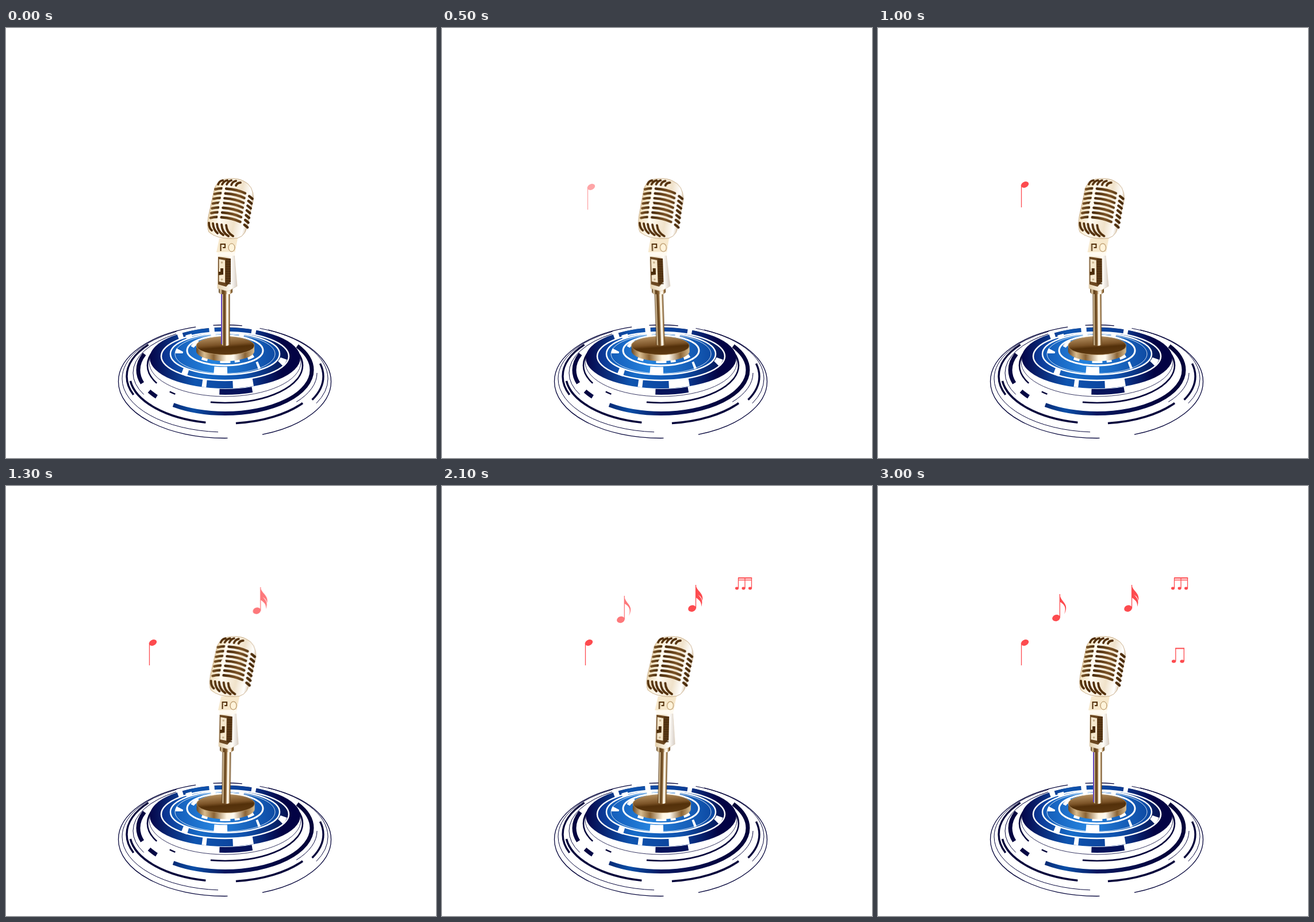
Recreate the animation shown at these times as an HTML page without scripts. Size 748 by 748 pixels, loop 3300 ms.

```html
<!DOCTYPE html>
<html lang="en">
<head>
<meta charset="utf-8">
<title>Microphone</title>
<style>
html, body { margin: 0; width: 100%; height: 100%; overflow: hidden; background: #fff; }
svg { display: block; width: 100vw; height: 100vh; fill: none; overflow: hidden; }

.mic, .note, .glint { animation: 3300ms infinite; }
.mic { transform-origin: 380px 600px; animation-name: sway; animation-timing-function: steps(6); }
.glint { animation-name: glint; animation-timing-function: step-end; }
.note { fill: #fd4b4f; stroke: #fd4b4f; stroke-width: 0; animation-timing-function: steps(4); }
.stem { fill: none; stroke-width: 1.3; }
.beam { fill: none; stroke-width: 2; }
.quarter { animation-name: quarter; }
.sixteenth { animation-name: sixteenth; }
.triplet { animation-name: triplet; }
.eighth { animation-name: eighth; }
.pair { animation-name: pair; }

@keyframes sway {
  0%, 90.9%, to { transform: skewX(0deg); }
  18.18% { transform: skewX(2.4deg); }
  36.36% { transform: skewX(-.6deg); }
  54.54% { transform: skewX(-1.8deg); }
  72.72% { transform: skewX(-.6deg); }
}
@keyframes glint {
  0%, 90.9%, to { opacity: 1; }
  3.03% { opacity: 0; }
}
@keyframes quarter {
  0%, 9.09% { opacity: 0; transform: translate(8px, 8px); }
  21.21%, to { opacity: 1; transform: none; }
}
@keyframes sixteenth {
  0%, 30.3% { opacity: 0; transform: translate(5px, 16px); }
  42.42%, to { opacity: 1; transform: none; }
}
@keyframes triplet {
  0%, 39.39% { opacity: 0; transform: translate(-10px, 8px); }
  51.51%, to { opacity: 1; transform: none; }
}
@keyframes eighth {
  0%, 54.54% { opacity: 0; transform: translate(4px, 12px); }
  66.66%, to { opacity: 1; transform: none; }
}
@keyframes pair {
  0%, 72.72% { opacity: 0; transform: translate(-14px, -8px); }
  84.84%, to { opacity: 1; transform: none; }
}
</style>
</head>
<body>
<svg viewBox="0 0 748 748">
  <defs>
    <linearGradient id="navy" gradientUnits="userSpaceOnUse" x1="230" x2="532">
      <stop offset=".08" stop-color="#050540"/>
      <stop offset=".32" stop-color="#0b4fa8"/>
      <stop offset=".5" stop-color="#07175f"/>
      <stop offset=".9" stop-color="#03033a"/>
    </linearGradient>
    <linearGradient id="band" gradientUnits="userSpaceOnUse" x1="250" x2="512">
      <stop offset="0" stop-color="#05064a"/>
      <stop offset=".3" stop-color="#0f55b0"/>
      <stop offset=".65" stop-color="#0b3f98"/>
      <stop offset=".88" stop-color="#030344"/>
    </linearGradient>
    <linearGradient id="blue" gradientUnits="userSpaceOnUse" x1="270" x2="492">
      <stop offset="0" stop-color="#0a2f8c"/>
      <stop offset=".3" stop-color="#176cc8"/>
      <stop offset=".65" stop-color="#0f52ae"/>
      <stop offset="1" stop-color="#04104f"/>
    </linearGradient>
    <linearGradient id="sky" gradientUnits="userSpaceOnUse" x1="286" x2="476">
      <stop offset="0" stop-color="#1259b6"/>
      <stop offset=".4" stop-color="#2583de"/>
      <stop offset="1" stop-color="#0c47a0"/>
    </linearGradient>
    <linearGradient id="shell" x1="0" x2="1" y1=".3" y2=".6">
      <stop offset="0" stop-color="#a98452"/>
      <stop offset=".13" stop-color="#f3e2c0"/>
      <stop offset=".35" stop-color="#fffaf0"/>
      <stop offset=".65" stop-color="#f0e2ca"/>
      <stop offset=".85" stop-color="#fff"/>
      <stop offset="1" stop-color="#bfa075"/>
    </linearGradient>
    <linearGradient id="slot" gradientUnits="userSpaceOnUse" x1="358" x2="430">
      <stop offset="0" stop-color="#8a6334"/>
      <stop offset=".3" stop-color="#432606"/>
      <stop offset=".65" stop-color="#7a5226"/>
      <stop offset="1" stop-color="#432606"/>
    </linearGradient>
    <linearGradient id="pole">
      <stop offset="0" stop-color="#4d2f0d"/>
      <stop offset=".14" stop-color="#e5d0aa"/>
      <stop offset=".28" stop-color="#5e3d17"/>
      <stop offset=".5" stop-color="#8a6334"/>
      <stop offset=".62" stop-color="#fff8e8"/>
      <stop offset=".78" stop-color="#fffaf0"/>
      <stop offset=".88" stop-color="#a98452"/>
      <stop offset="1" stop-color="#5e3d17"/>
    </linearGradient>
    <linearGradient id="rim">
      <stop offset="0" stop-color="#6b4720"/>
      <stop offset=".14" stop-color="#d9bd90"/>
      <stop offset=".3" stop-color="#8a6334"/>
      <stop offset=".52" stop-color="#fff6e2"/>
      <stop offset=".64" stop-color="#fffaf0"/>
      <stop offset=".84" stop-color="#8a6334"/>
      <stop offset="1" stop-color="#d9bd90"/>
    </linearGradient>
    <linearGradient id="top" x1=".35" x2=".6" y1="0" y2="1">
      <stop offset="0" stop-color="#b48f60"/>
      <stop offset=".45" stop-color="#7a5226"/>
      <stop offset=".6" stop-color="#53300a"/>
      <stop offset="1" stop-color="#5e3a12"/>
    </linearGradient>
    <linearGradient id="grip">
      <stop offset="0" stop-color="#e5d0aa"/>
      <stop offset=".7" stop-color="#fffdf8"/>
      <stop offset="1" stop-color="#d6cdc6"/>
    </linearGradient>
    <g id="slots">
      <path d="M364 280.500Q370 279 375 279"/>
      <path d="M383 279.500Q403 281 416 287.500"/>
      <path d="M423 292.500L428.500 297"/>
    </g>
  </defs>

  <!-- Outer rings: dashes run clockwise from the right, 360 per turn -->
  <g stroke="#06063c">
    <ellipse cx="380.500" cy="615" rx="185" ry="98.500" stroke-width="1.300" pathLength="360" stroke-dasharray="64 24 162 12 20 18 60"/>
    <ellipse cx="381" cy="610" rx="179" ry="93" pathLength="360" stroke-dasharray="20 75 140 60 65"/>
    <ellipse cx="381" cy="606" rx="171" ry="88" stroke-width="3.400" pathLength="360" stroke-dasharray="20 145 45 140 10"/>
    <ellipse cx="381" cy="603" rx="166" ry="85" stroke-width="3.600" pathLength="360" stroke-dasharray="0 27 54.500 23.500 70 185"/>
    <ellipse cx="381" cy="600" rx="160" ry="80" pathLength="360" stroke-dasharray="30 130 70 130"/>
    <ellipse cx="381" cy="587" rx="135" ry="65" stroke-width="2.600" pathLength="360" stroke-dasharray="104 35 6 15 45 115 40"/>
    <ellipse cx="381" cy="581" rx="132" ry="60" stroke-width=".8"/>
  </g>
  <ellipse cx="381" cy="595" rx="151" ry="75.500" stroke="url(#navy)" stroke-width="7" pathLength="360" stroke-dasharray="135 16 8 9 27 140 25"/>
  <ellipse cx="381" cy="580" rx="127" ry="53" stroke="#06135a" stroke-width="10" pathLength="360" stroke-dasharray="0 61 35 264"/>

  <!-- Inner bands, each painted over the last, with white gaps -->
  <g stroke="#fff">
    <ellipse cx="381" cy="574" rx="131" ry="53" fill="url(#band)" stroke="none"/>
    <ellipse cx="381" cy="573" rx="120" ry="47" stroke-width="14" pathLength="360" stroke-dasharray="0 58 23 30 5 100 6 30 6 42 5 55"/>
    <ellipse cx="381" cy="571" rx="111" ry="42" fill="url(#blue)" stroke-width="2.500"/>
    <ellipse cx="381" cy="570" rx="103" ry="39" stroke-width="12" pathLength="360" stroke-dasharray="0 4 8 128 8 70 8 134"/>
    <ellipse cx="381" cy="567" rx="95" ry="36" fill="url(#sky)" stroke-width="2.500"/>
    <ellipse cx="381" cy="567" rx="87" ry="34" stroke-width=".8"/>
    <ellipse cx="381" cy="566" rx="80" ry="30" stroke-width="13" pathLength="360" stroke-dasharray="0 30 4 52 23 71 6 60 8 40 8 58"/>
    <ellipse cx="381" cy="561" rx="66" ry="26" fill="url(#sky)" stroke-width="3"/>
    <ellipse cx="381" cy="559" rx="58" ry="21" stroke-width="6" pathLength="360" stroke-dasharray="0 20 15 20 12 10 25 30 14 40 20 30 12 112"/>
  </g>

  <g class="mic">
    <path fill="url(#rim)" d="M331 553V562A50.500 17.500 0 0 0 432 562V553Z"/>
    <ellipse cx="381.500" cy="552.500" rx="50.500" ry="16" fill="url(#top)" stroke="#c9a877" stroke-width=".7"/>
    <path fill="url(#pole)" d="M374.500 456H389.500V551Q382 555 374.500 551Z"/>
    <path class="glint" stroke="#6244bd" stroke-width="2" d="M375 463V550"/>
    <path fill="url(#pole)" d="M370 453H394V460L390 463H373L370 460Z"/>

    <path fill="url(#grip)" stroke="#d9c8ae" stroke-width=".7" d="M369 396L397 393L402 449L386 458L368 453Z"/>
    <path fill="#6b4720" d="M369 398L391 401V441L383 450L369 446Z"/>
    <path stroke="#3d2206" stroke-width="9" stroke-dasharray="1.500 1.500" d="M386.500 402V446"/>
    <path fill="#f6e8cd" d="M370.500 402L381 404V443L370.500 441Z"/>
    <path fill="#4b2c08" d="M373 418H378V429L370 430V424H373Z"/>
    <g fill="#c8b18c"><circle cx="375.500" cy="408" r="1.800"/><circle cx="375.500" cy="437.500" r="1.800"/></g>

    <path fill="#f7e8cb" d="M371 366H403L398 392L366 390Z"/>
    <path fill="#fffaf0" d="M368 390L398 389V396L368 398Z"/>
    <path stroke="#53300a" stroke-width="2" d="M373.500 388V376H381V382H377"/>
    <ellipse cx="392.500" cy="382" rx="5.500" ry="7" fill="#fff3da" stroke="#a98452"/>

    <path fill="url(#shell)" stroke="#bfa075" stroke-width=".8"
      d="M363 278Q370 262 389 262Q404 261 413 266Q431 274 430.500 298L419 347Q414 367 394 366.500Q367 367 353 355Q349 346 352 328Z"/>
    <g stroke="url(#slot)" stroke-width="4.400" stroke-linecap="round">
      <use href="#slots"/>
      <use href="#slots" x="-1.400" y="8.300"/>
      <use href="#slots" x="-2.800" y="16.600"/>
      <use href="#slots" x="-4.200" y="24.900"/>
      <use href="#slots" x="-5.600" y="33.200"/>
      <use href="#slots" x="-7" y="41.500"/>
      <use href="#slots" x="-8.400" y="49.800"/>
    </g>
    <g stroke="#53300a" stroke-width="3.800" stroke-linecap="round">
      <path d="M369 272Q371 266 377 265M376 272Q379 266 385 265M384 272Q387 266 392 265M392 273Q394 267 400 266M400 274Q402 269 408 269"/>
      <path d="M353 339Q353 348 358 352M360 340Q361 351 368 357M367 341Q368 354 378 360M375 342Q376 356 387 362M383 343Q384 356 395 362"/>
    </g>
    <path stroke="#fffaf0" stroke-width="4" d="M379 276L369 336"/>
    <circle cx="374" cy="306" r="4" fill="#fffaf0"/>
  </g>

  <g class="note quarter">
    <ellipse rx="7" ry="5" transform="translate(255.500 272.500) rotate(-25)"/>
    <path class="stem" d="M249.500 273V312"/>
  </g>
  <g class="note sixteenth">
    <ellipse rx="7" ry="5.500" transform="translate(435 213) rotate(-20)"/>
    <path class="stem" d="M441.500 172V213"/>
    <path d="M441 172C444 184 456 186 453 200C452 191 444 189 441 185ZM441 181C444 192 457 194 451 210C452 199 444 197 441 193Z"/>
  </g>
  <g class="note triplet">
    <path class="stem" d="M515.500 160V178M527 160V178M538.500 160V178M515 163.500H539"/>
    <path class="beam" d="M515 160H539.200"/>
    <ellipse cx="513" cy="178" rx="3" ry="2.400"/>
    <ellipse cx="524.500" cy="178" rx="3" ry="2.400"/>
    <ellipse cx="536" cy="178" rx="3" ry="2.400"/>
  </g>
  <g class="note eighth">
    <ellipse rx="7" ry="5.500" transform="translate(310 229.500) rotate(-20)"/>
    <path class="stem" d="M316.300 188V229"/>
    <path d="M316 188C318 203 334 204 324 223C329 208 321 205 316 201Z"/>
  </g>
  <g class="note pair">
    <path class="stem" d="M517.800 282V305M532.300 282V305"/>
    <path class="beam" d="M517.200 282.500H533"/>
    <ellipse cx="514.500" cy="305" rx="3.600" ry="2.700"/>
    <ellipse cx="529" cy="305" rx="3.600" ry="2.700"/>
  </g>
</svg>
</body>
</html>
```
